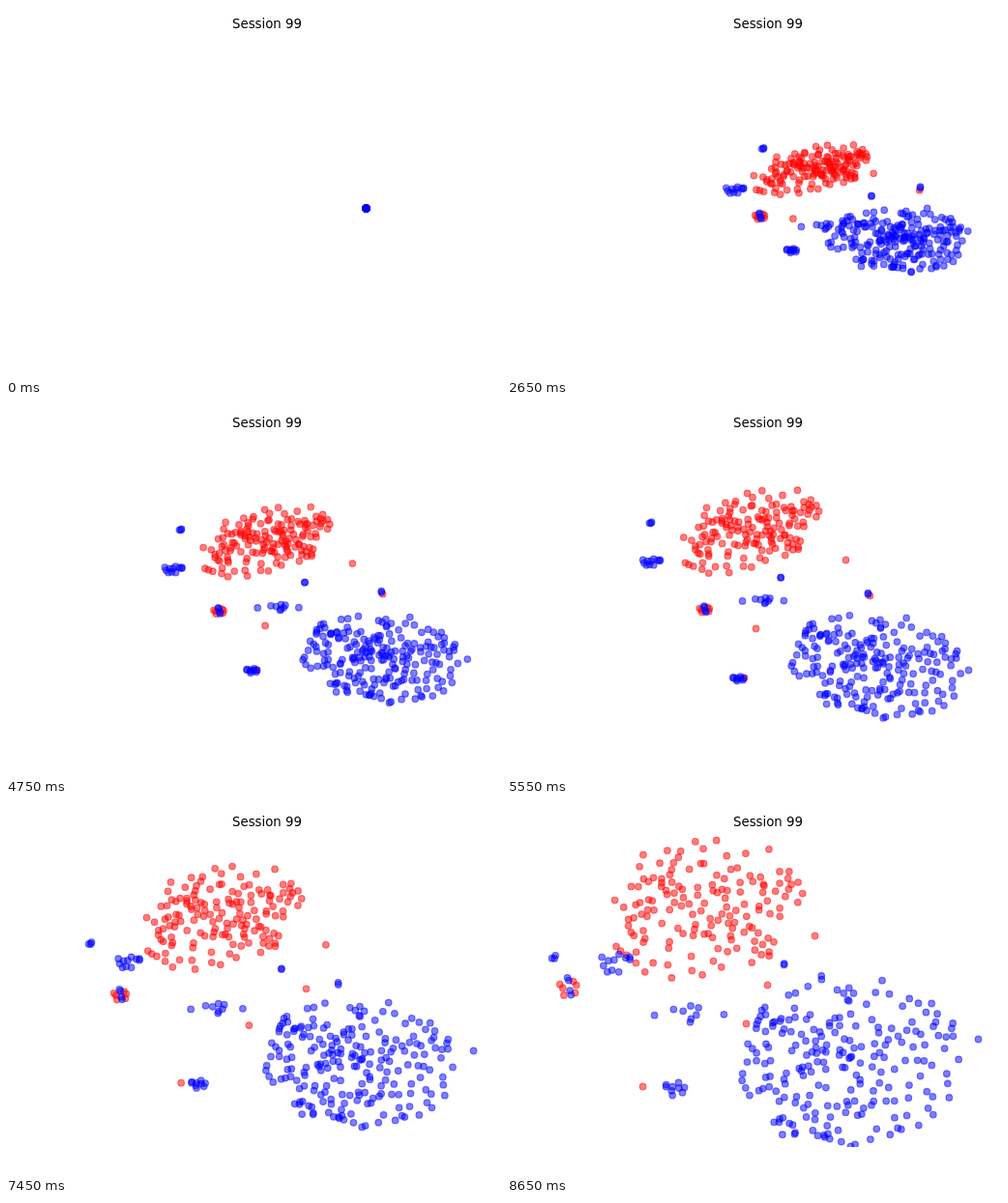
Recreate the animation shown at these times as an HTML page with a canvas. Size 512x384 px, loop 8700 ms.

```html
<!DOCTYPE html>
<html lang="en">
<head>
<meta charset="utf-8">
<title>Session 99</title>
<style>
  html, body { margin: 0; width: 100%; height: 100%; overflow: hidden; background: #fff; }
  svg, canvas { position: absolute; left: 0; top: 0; width: 512px; height: 384px; }
  text { font: 13.333px "DejaVu Sans", sans-serif; text-anchor: middle; }
</style>
</head>
<body>
<canvas id="plot" width="512" height="384"></canvas>
<svg viewBox="0 0 512 384"><text x="270" y="23">Session 99</text></svg>
<script>
const LOOP = 8700, STEP = 50;
const STAGES = [100, 1700, 5550, 8650];
const ORIGIN = [372, 209, 0, 0, 0];
const RED = '#f00', BLUE = '#00f';
const ctx = document.getElementById('plot').getContext('2d');
const groups = [];

function seeded(a) {
  return () => {
    a = a + 0x6D2B79F5 | 0;
    let t = Math.imul(a ^ a >>> 15, 1 | a);
    t = t + Math.imul(t ^ t >>> 7, 61 | t) ^ t;
    return ((t ^ t >>> 14) >>> 0) / 4294967296;
  };
}

// Scattered points in the unit disc, kept a little apart, each with its own jitter.
function disc(count, seed) {
  const rnd = seeded(seed), pts = [], gap = .5 / Math.sqrt(count);
  while (pts.length < count) {
    const r = Math.sqrt(rnd()), a = rnd() * 2 * Math.PI;
    const x = r * Math.cos(a), y = r * Math.sin(a);
    if (pts.every(p => Math.hypot(p.x - x, p.y - y) > gap))
      pts.push({ x, y, jx: rnd() - .5, jy: rnd() - .5 });
  }
  return pts;
}

// One key per stage: centre x, y, radius x, y, tilt.
function cloud(color, count, ...keys) {
  groups.push({ color, pts: disc(count, 11 + groups.length), keys: [ORIGIN, ...keys] });
}

// A small cluster follows its centres and opens out to its full radius.
function cluster(color, count, rx, ry, ...centres) {
  const keys = centres.map(([x, y], i) => {
    const open = i === 2;
    return [x, y, rx * (open ? 1 : .6), ry * (open ? 1 : .35), 0];
  });
  cloud(color, count, ...keys);
}

const stray = (color, ...centres) => cluster(color, 1, 0, 0, ...centres);

cloud(RED, 150, [332, 182, 62, 23, -12], [251, 129, 75, 42, -18], [207, 106, 104, 75, -10]);
stray(RED, [308, 216], [257, 231], [247, 227]);
stray(RED, [443, 188], [375, 197], [269, 187]);
stray(RED, [310, 242], [245, 282], [140, 292]);
stray(RED, [388, 177], [350, 160], [318, 136]);

const mixed = [[279, 218], [204, 210], [64, 186]];
cluster(RED, 6, 14, 15, ...mixed);
cluster(BLUE, 4, 8, 15, ...mixed);

cloud(BLUE, 212, [408, 232, 70, 32, 1], [382, 269, 91, 54, 9], [356, 267, 117, 88, -3]);
stray(BLUE, [476, 219], [477, 274], [487, 243]);
cluster(BLUE, 3, 3, 4, [302, 155], [148, 121], [48, 157]);
cluster(BLUE, 11, 24, 14, [263, 199], [150, 162], [115, 164]);
cluster(BLUE, 9, 15, 12, [309, 242], [237, 282], [171, 292]);
cluster(BLUE, 9, 40, 9, [343, 236], [264, 202], [188, 217]);
cluster(BLUE, 2, 9, 2, [404, 202], [280, 178], [282, 165]);
cluster(BLUE, 2, 9, 4, [442, 185], [371, 195], [322, 180]);

function marker(x, y) {
  ctx.beginPath();
  ctx.arc(x, y, 3.33, 0, 2 * Math.PI);
  ctx.fill();
  ctx.stroke();
}

function draw(time) {
  const t = Math.max(time, STAGES[0]);
  const i = t < STAGES[1] ? 0 : t < STAGES[2] ? 1 : 2;
  const u = Math.min(1, (t - STAGES[i]) / (STAGES[i + 1] - STAGES[i]));
  // A fast burst first; later the centres drift steadily and the sizes speed up.
  const burst = 1 - (1 - u) ** 2;
  const move = i ? u : burst, grow = i ? u * u : burst;
  const crowd = .3 / Math.max(1, i + move);
  const skew = 1.5 * (crowd - .15);

  ctx.fillStyle = '#fff';
  ctx.fillRect(0, 0, 512, 384);
  ctx.save();
  ctx.beginPath();
  ctx.rect(0, 29, 512, 326);
  ctx.clip();
  ctx.translate(.5, .5);
  ctx.globalAlpha = .5;
  ctx.lineWidth = 1.11;
  for (const { color, pts, keys } of groups) {
    const [cx, cy, rx, ry, tilt] = keys[i].map((v, n) => v + (keys[i + 1][n] - v) * (n < 2 ? move : grow));
    ctx.fillStyle = ctx.strokeStyle = color;
    for (const p of pts) {
      const pull = Math.hypot(p.x, p.y) ** crowd;
      const x = p.x * pull + p.jx * crowd * .5;
      const y = p.y * pull + p.jy * crowd * .5;
      const sx = x + skew * (1 - x * x);
      marker(cx + rx * sx, cy + ry * y + tilt * sx);
    }
  }
  ctx.restore();
}

const start = performance.now();
function tick() {
  const t = (performance.now() - start) % LOOP;
  draw(Math.floor(t / STEP) * STEP);
  requestAnimationFrame(tick);
}
tick();
</script>
</body>
</html>
```
